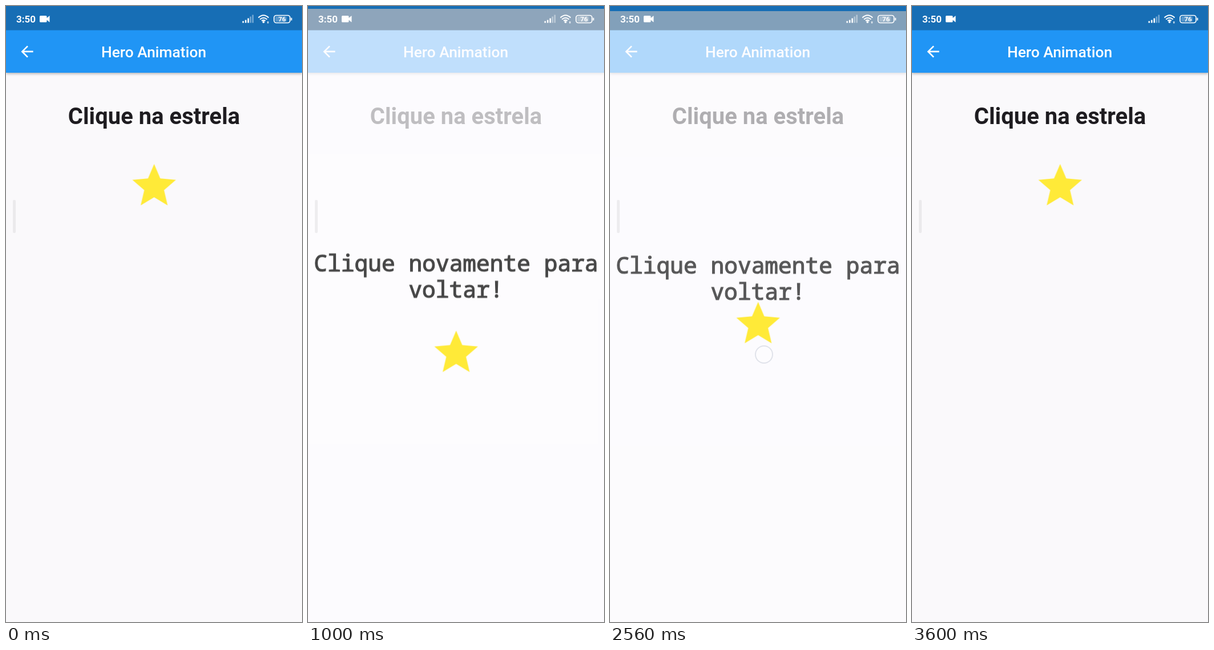
Animation of 519x1080 px, one loop 3.64 s. Source, as an HTML page:

```html
<!DOCTYPE html>
<html lang="pt">
<head>
<meta charset="utf-8">
<title>Hero Animation</title>
<style>
  html, body { margin: 0; width: 100%; height: 100%; overflow: hidden; background: #faf9fb; }
  svg { display: block; width: 100%; height: 100%; }
  text { font-family: Roboto, sans-serif; }
  .mid { text-anchor: middle; }
  .title { font-size: 26.4px; font-weight: 500; fill: #fff; }
  .head { font-size: 40px; font-weight: 700; fill: #1e1c20; }
  .back { font: 39.6px "Noto Sans Mono", "DejaVu Sans Mono", monospace; stroke: #000; stroke-width: 1.2px; }
  .bar { filter: drop-shadow(0 2px 2px rgba(0, 0, 0, .28)); }

  .page, .star, .tap { animation: 3640ms linear infinite; }
  .page { animation-name: slide, fade; }
  .star { animation-name: fly; }
  .tap { animation-name: tap; fill: rgba(255, 255, 255, .35); stroke: rgba(150, 160, 180, .4); stroke-width: 2px; }
  .first { animation-delay: -2980ms; }
  .second { animation-delay: -1242ms; }

  /* The way back starts with a short jump, then follows the rest of its curve */
  @keyframes slide {
    0% { transform: translateY(270px); }
    20.74% { transform: translateY(270px); animation-timing-function: cubic-bezier(.4, 0, .2, 1); }
    28.98%, 70.29% { transform: translateY(0); }
    70.3% { transform: translateY(8.5px); animation-timing-function: cubic-bezier(.697, .175, .54, 1); }
    76.73%, 100% { transform: translateY(270px); }
  }
  @keyframes fade {
    0% { opacity: 0; }
    20.74% { opacity: 0; animation-timing-function: cubic-bezier(.42, 0, 1, 1); }
    28.98%, 70.29% { opacity: 1; }
    70.3% { opacity: .661; animation-timing-function: cubic-bezier(.266, .439, .671, 1); }
    76.73%, 100% { opacity: 0; }
  }
  @keyframes fly {
    0% { transform: translateY(0); }
    20.74% { transform: translateY(0); animation-timing-function: cubic-bezier(.4, 0, .2, 1); }
    28.98%, 70.29% { transform: translateY(298px); }
    70.3% { transform: translateY(246px); animation-timing-function: cubic-bezier(.183, .347, .245, 1); }
    76.73%, 100% { transform: translateY(0); }
  }
  @keyframes tap {
    0%, 2.6% { opacity: 1; }
    8.65%, 100% { opacity: 0; }
  }
</style>
</head>
<body>
<svg viewBox="0 0 519 1080">
  <!-- first page -->
  <rect width="519" height="1080" fill="#faf9fb"/>
  <rect class="bar" width="519" height="117" fill="#2095f5"/>
  <path transform="translate(21.2 64.1) scale(1.32)" fill="#fff"
    d="M20 11H7.83l5.59-5.59L12 4l-8 8 8 8 1.41-1.41L7.83 13H20z"/>
  <text class="title mid" x="259" y="90">Hero Animation</text>
  <text class="head mid" x="259.5" y="207">Clique na estrela</text>

  <!-- second page -->
  <g class="page">
    <rect width="519" height="1080" fill="#fefcff"/>
    <text class="back mid" x="259.5" y="459.5">Clique novamente para</text>
    <text class="back mid" x="259.5" y="505.5">voltar!</text>
  </g>

  <g class="star">
    <path transform="translate(213.9 269.4) scale(3.82)" fill="#ffea38"
      d="M12 17.27L18.18 21l-1.64-7.03L22 9.24l-7.19-.61L12 2 9.19 8.63 2 9.24l5.46 4.73L5.82 21z"/>
  </g>

  <!-- system overlay -->
  <rect width="519" height="42.5" fill="#000" opacity=".26"/>
  <g fill="#fff">
    <text x="18" y="29" font-size="17" font-weight="700">3:50</text>
    <path d="M60.5 17h9.5a1.5 1.5 0 0 1 1.5 1.5v2.6l5-4v11.4l-5-4v2.5a1.5 1.5 0 0 1-1.5 1.5h-9.500a1.500 1.500 0 0 1-1.500-1.500v-8.500a1.500 1.500 0 0 1 1.500-1.500z"/>
    <path d="M414.500 26.500h2.600v3h-2.600zM419 24.500h2.600v5h-2.600zM423.500 21.500h2.600v8h-2.600z"/>
    <path opacity=".4" d="M427.500 18.500h2.600v11h-2.600zM431.500 15.500h2.600v14h-2.600z"/>
    <circle cx="451.500" cy="28" r="2"/>
    <g fill="none" stroke="#fff" stroke-width="2">
      <path d="M442.500 20.500q9-8.500 18 0M445.300 23.500q6.200-5.600 12.400 0M448.200 26q3.300-2.800 6.600 0"/>
      <rect x="470" y="16.500" width="28" height="13" rx="4" stroke-width="1.700"/>
    </g>
    <rect x="458" y="27" width="2.500" height="3.500" opacity=".7"/>
    <rect x="472" y="18.500" width="20" height="9" rx="2" opacity=".28"/>
    <rect x="499.500" y="20.500" width="2" height="5" rx="1"/>
    <text class="mid" x="484" y="27" font-size="11.500" font-weight="700">76</text>
  </g>
  <rect x="12" y="340" width="5" height="58" rx="2" opacity=".06"/>
  <circle class="tap first" cx="265" cy="328" r="15"/>
  <circle class="tap second" cx="270" cy="611" r="15"/>
</svg>
</body>
</html>
```
